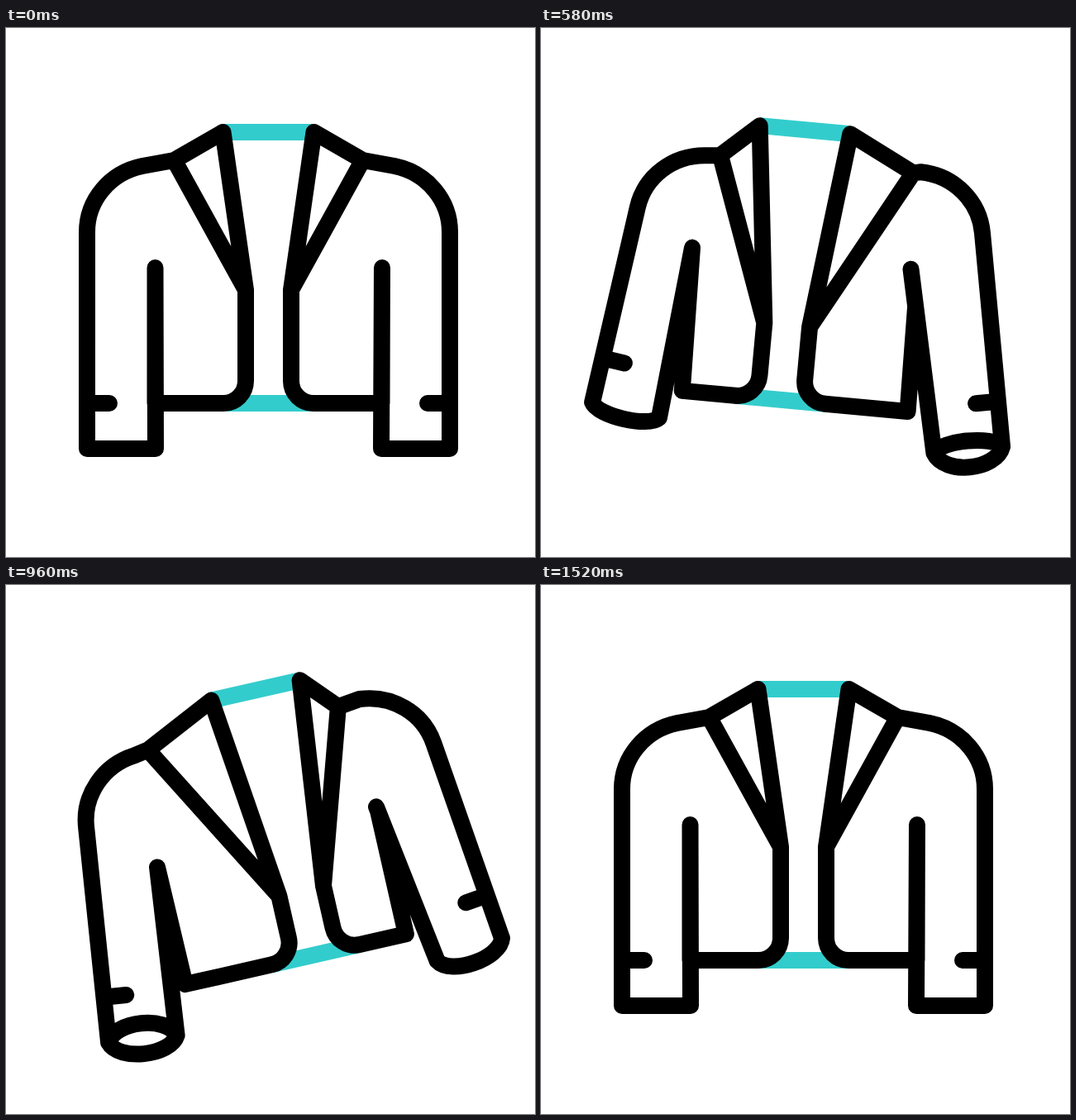
Animation, 640 px wide and 640 px high, one loop 2400 ms. Source, as an HTML page:

```html
<!DOCTYPE html>
<html lang="en">
<head>
<meta charset="utf-8">
<title>Jacket</title>
<style>
  html, body { margin: 0; width: 100%; height: 100%; overflow: hidden; background: #fff; }
  svg { display: block; width: 100%; height: 100%; }
  path { fill: none; stroke-width: 20; }
  #back { stroke: #33cccc; }
  #front { stroke: #000; stroke-linecap: round; stroke-linejoin: round; }
</style>
</head>
<body>
<svg viewBox="0 0 640 640"><path id="back"/><path id="front"/></svg>
<script>
const LOOP = 2400;
const TIMES = [0, 260, 580, 820, 960, 1280, 1520];

// Smooth curve through the keys, at rest at both ends.
function track(values, times = TIMES) {
  const v = [...values, values[0]];
  const rise = i => (v[i + 1] - v[i]) / (times[i + 1] - times[i]);
  const slope = v.map((_, i) => {
    if (i === 0 || i === v.length - 1) return 0;
    const before = times[i] - times[i - 1], after = times[i + 1] - times[i];
    return (rise(i - 1) * after + rise(i) * before) / (before + after);
  });
  return t => {
    if (t >= times[times.length - 1]) return v[0];
    const i = times.findIndex(time => time > t) - 1;
    const h = times[i + 1] - times[i], s = (t - times[i]) / h, r = 1 - s;
    return r * r * (1 + 2 * s) * v[i] + s * s * (3 - 2 * s) * v[i + 1]
      + s * r * h * (r * slope[i] - s * slope[i + 1]);
  };
}

const tracks = keys => Object.entries(keys).map(([name, values]) => [name, track(values)]);
const sample = (list, t) => Object.fromEntries(list.map(([name, at]) => [name, at(t)]));

const height = track([126, 163.5, 188, 123.5, 75.5, 127, 182, 161],
  [0, 260, 400, 580, 820, 960, 1120, 1280, 1520]);

const body = tracks({
  x: [317.5, 319, 319.5, 310, 302, 319],
  turn: [0, 5, 5.3, -7.9, -12.8, -2.2],
  shift: [0, 17, 18, -17, -25, -7],
  drop: [0, 26, 46, 56, 58, 18]
});

// x, y: outer wrist; pitX, pitY: armpit; y values count from the collar.
const leftSleeve = tracks({
  x: [98, 71, 62, 104, 124, 99],
  y: [383, 341.5, 329.5, 402.5, 426, 389],
  turn: [0, 9.4, 13.1, -0.7, -5.9, 0],
  length: [262, 245, 242, 256, 262, 259],
  pitX: [180.5, 183, 183, 180, 183, 180],
  pitY: [164, 144.5, 142.5, 196.5, 214, 176],
  upper: [0, 10, 11, -14, -19, -6],
  lower: [0, 10, 11, 10, 18, 16]
});
const rightSleeve = tracks({
  x: [537, 544, 558, 591, 600, 554],
  y: [383, 389.5, 383.5, 323.5, 300, 364],
  turn: [0, -1.8, -5.3, -15.8, -19.3, -4.3],
  length: [262, 259, 260, 250, 250, 254],
  pitX: [455, 450, 447.5, 449.5, 448, 454.5],
  pitY: [164, 170.5, 168.5, 142, 141, 161],
  upper: [0, -8, -11, 9, 17, 6],
  lower: [0, 15, 21, 18, 17, 6]
});

// Local coordinates turned by some degrees around an origin.
function frame(ox, oy, degrees) {
  const a = degrees * Math.PI / 180, c = Math.cos(a), s = Math.sin(a);
  return (x, y) => [ox + x * c - y * s, oy + x * s + y * c];
}

function half(side, b, arm, top, at) {
  const wrist = frame(arm.x, top + arm.y, arm.turn);
  const sleeve = (x, y) => wrist(-side * x, y);
  const shoulder = at(side * (114 + 0.07 * b.drop) + b.shift, 34 + 0.13 * b.drop);
  const tip = at(side * 55, 0);
  const lapel = at(side * 27.5, 191 + b.drop);
  const pit = [arm.pitX, top + arm.pitY];
  const cuffEnd = sleeve(83, 0);
  const cuff = bulge => `C${sleeve(10, bulge * 4 / 3)} ${sleeve(73, bulge * 4 / 3)} ${cuffEnd}`;
  const fold = side > 0 ? 0.13 + 0.004 * b.shift : 0;
  const seam = pit.map((p, i) => p + (cuffEnd[i] - p) * fold);
  const len = arm.length;
  return `M${shoulder}L${tip}L${lapel}Z
    M${lapel}L${at(side * 27.5, 301)}
    A27 27 0 0 ${side < 0 ? 1 : 0} ${at(side * 54.5, 328)}
    L${at(side * 137 + b.shift, 328)}L${seam}
    M${shoulder}L${sleeve(67, -len - 80)}
    C${sleeve(28, -len - 72)} ${sleeve(0, -len - 39)} ${sleeve(0, -len)}
    L${sleeve(0, 0)}${cuff(arm.lower)}L${pit}
    M${sleeve(0, 0)}${cuff(arm.upper)}
    M${sleeve(0, -55)}L${sleeve(27, -55)}`;
}

const back = document.getElementById("back");
const front = document.getElementById("front");

function draw() {
  const t = performance.now() % LOOP;
  const b = sample(body, t), top = height(t);
  const at = frame(b.x, top, b.turn);
  back.setAttribute("d", `M${at(-55, 0)}L${at(55, 0)}M${at(-54.5, 328)}L${at(54.5, 328)}`);
  front.setAttribute("d",
    half(-1, b, sample(leftSleeve, t), top, at) + half(1, b, sample(rightSleeve, t), top, at));
  requestAnimationFrame(draw);
}
draw();
</script>
</body>
</html>
```
